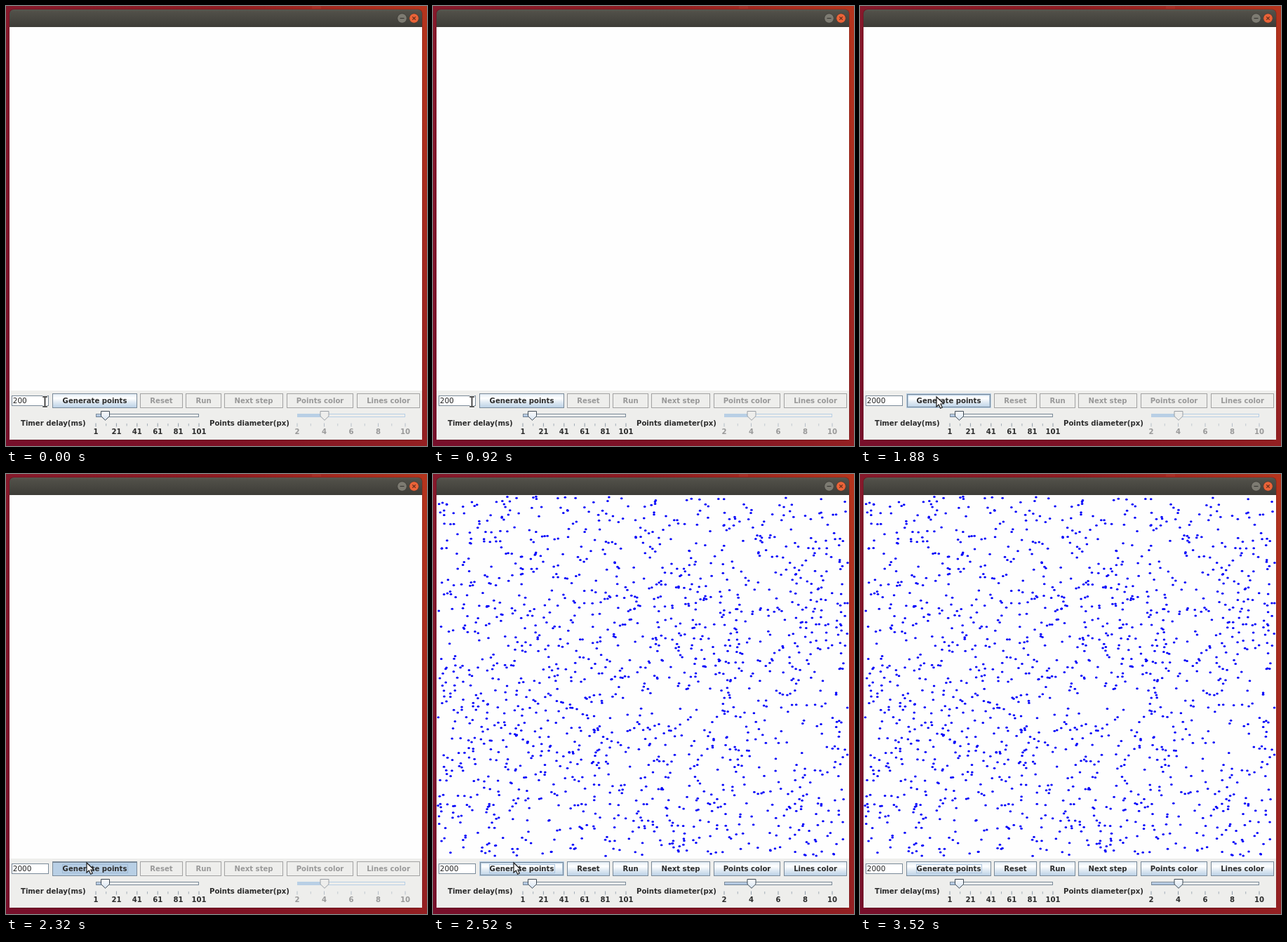
An HTML page with a canvas for the animation above (4000 ms loop, 600x627 px).

```html
<!DOCTYPE html>
<html lang="en">
<head>
<meta charset="utf-8">
<style>
html, body { margin: 0; width: 100%; height: 100%; overflow: hidden; }
canvas { display: block; width: 600px; height: 627px; }
</style>
</head>
<body>
<canvas id="stage" width="600" height="627"></canvas>
<script>
const g = document.getElementById('stage').getContext('2d');
const LOOP = 4000;
const STEEL = '#7a8a99', SKY = '#b8cfe5', INK = '#2c2c2c', FADED = '#999', PANEL = '#eeeeec';
const BOLD = 'bold 10.1px "DejaVu Sans", sans-serif';
const PLAIN = '10.5px "DejaVu Sans", sans-serif';

// label, left, right
const buttons = [
  ['Generate points', 66, 187], ['Reset', 191, 252], ['Run', 256, 307],
  ['Next step', 311, 395], ['Points color', 400, 495], ['Lines color', 500, 590]
];

// time, tip x, tip y
const pointer = [
  [1720, 69, 563], [1800, 90, 559], [1880, 109, 557], [1920, 112, 555], [2000, 115, 554],
  [3120, 117, 554], [3200, 127, 550], [3240, 148, 540], [3320, 189, 517],
  [3360, 236, 491], [3440, 317, 454]
];

let seed = 2000;
function random() {
  seed = (seed * 16807) % 2147483647;
  return seed / 2147483647;
}
const dots = Array.from({ length: 1580 }, () => [7 + random() * 584, 32 + random() * 513]);

function rect(x, y, w, h, fill) {
  g.fillStyle = fill;
  g.fillRect(x, y, w, h);
}

function frame(x, y, w, h, color) {
  g.strokeStyle = color;
  g.lineWidth = 1;
  g.strokeRect(x + .5, y + .5, w - 1, h - 1);
}

function line(x1, y1, x2, y2, color, width = 1) {
  g.strokeStyle = color;
  g.lineWidth = width;
  g.beginPath();
  g.moveTo(x1, y1);
  g.lineTo(x2, y2);
  g.stroke();
}

function disc(x, y, r, fill, edge) {
  g.beginPath();
  g.arc(x, y, r, 0, 7);
  g.fillStyle = fill;
  g.fill();
  g.strokeStyle = edge;
  g.lineWidth = .8;
  g.stroke();
}

function shape(points, fill, edge, width = 1) {
  g.beginPath();
  points.forEach(([x, y]) => g.lineTo(x, y));
  g.closePath();
  g.fillStyle = fill;
  g.fill();
  g.strokeStyle = edge;
  g.lineWidth = width;
  g.stroke();
}

function text(s, x, y, color, align = 'center', font = BOLD) {
  g.font = font;
  g.textAlign = align;
  g.fillStyle = color;
  g.fillText(s, x, y);
}

function blend(x1, y1, x2, y2, ...stops) {
  const b = g.createLinearGradient(x1, y1, x2, y2);
  stops.forEach(([at, color]) => b.addColorStop(at, color));
  return b;
}

function drawWindow() {
  rect(0, 0, 600, 627, blend(0, 0, 600, 0, [0, '#86192b'], [.5, '#8f1c22'], [1, '#b5341c']));
  rect(0, 0, 600, 627, blend(0, 0, 0, 627, [0, '#70002800'], [1, '#60002a66']));
  rect(436, 0, 13, 4, '#c0504033');
  g.fillStyle = '#2a000a55';
  g.beginPath();
  g.roundRect(4.5, 4.5, 589, 614.5, 6);
  g.fill();
  g.fillStyle = blend(0, 5, 0, 30, [0, '#59574f'], [.15, '#504f48'], [1, '#3d3c37']);
  g.beginPath();
  g.roundRect(5, 5, 588, 26, [6, 6, 0, 0]);
  g.fill();
  disc(564.5, 17.5, 6.8, '#7d7b72', '#3d3c36');
  line(561.5, 17.5, 567.5, 17.5, '#3a3934', 1.2);
  disc(581.5, 17.5, 6.8, '#ea6338', '#4a3a32');
  line(579.3, 15.3, 583.7, 19.7, '#5a2a1a', 1.2);
  line(583.7, 15.3, 579.3, 19.7, '#5a2a1a', 1.2);
  rect(5, 30, 588, 518, '#fefefe');
  rect(5, 548, 588, 70, PANEL);
}

function drawDots() {
  g.fillStyle = '#0000fa';
  for (const [x, y] of dots) {
    g.beginPath();
    g.ellipse(x, y, 1.8, 1.5, 0, 0, 7);
    g.fill();
  }
}

function drawButton([label, x, right], on, { hover, pressed, focus } = {}) {
  const w = right - x;
  const shine = blend(0, 553, 0, 573, [0, '#e4edf5'], [.3, '#fff'], [.55, '#e3ecf4'], [1, SKY]);
  rect(x, 552, w, 21, pressed ? SKY : on ? shine : PANEL);
  if (hover) {
    frame(x, 552, w, 21, SKY);
    frame(x + 1, 553, w - 2, 19, STEEL);
    frame(x + 2, 554, w - 4, 17, SKY);
  } else {
    frame(x, 552, w, 21, on ? STEEL : '#a2a2a2');
  }
  if (pressed) line(x, 553.5, right, 553.5, STEEL);
  if (focus) frame(80, 556, 94, 13, pressed ? '#9fb9d4' : '#a9c2dc');
  text(label, x + w / 2, 566.3, on ? INK : FADED);
}

function drawSlider(left, right, thumb, labels, on) {
  const edge = on ? STEEL : SKY;
  rect(left, 581, right - left, 5, PANEL);
  rect(left, 581, thumb - left, 5, on ? blend(0, 581, 0, 586, [0, '#dbe6f2'], [1, '#8eabcf']) : SKY);
  frame(left, 581, right - left, 5, edge);
  const gap = (right - left) / (labels.length - 1);
  labels.forEach((label, i) => {
    const x = left + i * gap;
    line(x, 594.5, x, 599.5, on ? '#8d9aa6' : '#b5bec8');
    if (i < labels.length - 1) line(x + gap / 2, 595, x + gap / 2, 598.5, on ? '#a5afb9' : '#c2c9d0');
    text(label, x, 610.3, on ? INK : FADED);
  });
  const pentagon = [[-6, 577.5], [6, 577.5], [6, 584.5], [0, 590.3], [-6, 584.5]];
  const fill = on ? blend(0, 577, 0, 590, [0, '#fff'], [1, '#d5e2ef']) : PANEL;
  shape(pentagon.map(([x, y]) => [thumb + x, y]), fill, on ? '#3f4a55' : '#9a9fa5');
}

function drawField(t) {
  rect(8, 555, 53, 15, '#fff');
  frame(8, 555, 53, 15, STEEL);
  const typed = t >= 1080;
  text(typed ? '2000' : '200', 9.7, 566.4, '#222', 'left', PLAIN);
  if (t >= 320 && t < 920 || typed && t < 1520) rect(typed ? 37 : 30, 556.5, 1, 12, '#333');
}

function drawBeam(x, y) {
  for (const [color, width] of [['#fff', 3.4], ['#1c1c1c', 1.5]]) {
    line(x, y - 6, x, y + 6, color, width);
    line(x - 3.3, y - 7, x + 3.3, y - 7, color, width);
    line(x - 3.3, y + 7, x + 3.3, y + 7, color, width);
  }
}

function drawArrow(x, y) {
  const outline = [[0, 0], [0, 14], [3.3, 11], [5.6, 16.2], [8.2, 15], [5.9, 10], [10.2, 9.8]];
  shape(outline.map(([dx, dy]) => [x + dx, y + dy]), '#fff', '#1a1a1a', 1.2);
}

function draw(t) {
  const at = pointer.filter(p => p[0] <= t).pop();
  const gone = t >= 3520;
  const ready = t >= 2480, done = t >= 2520;
  const over = at && !gone && at[1] > 66 && at[1] < 187 && at[2] > 552;
  const pressed = t >= 2320 && !done;

  drawWindow();
  if (done) drawDots();
  drawField(t);
  buttons.forEach((b, i) => {
    if (i === 0) drawButton(b, true, { hover: over && !pressed, pressed, focus: t >= 2320 });
    else drawButton(b, i === 1 ? done : ready);
  });
  text('Timer delay(ms)', 21, 598.3, INK, 'left');
  text('Points diameter(px)', 290, 598.3, INK, 'left');
  drawSlider(128, 275, 141.5, [1, 21, 41, 61, 81, 101], true);
  drawSlider(415, 569, 454, [2, 4, 6, 8, 10], ready);
  if (!at) drawBeam(55.5, 564);
  else if (!gone) drawArrow(at[1], at[2]);
}

const start = performance.now();
function tick() {
  draw((performance.now() - start) % LOOP);
  requestAnimationFrame(tick);
}
tick();
</script>
</body>
</html>
```
